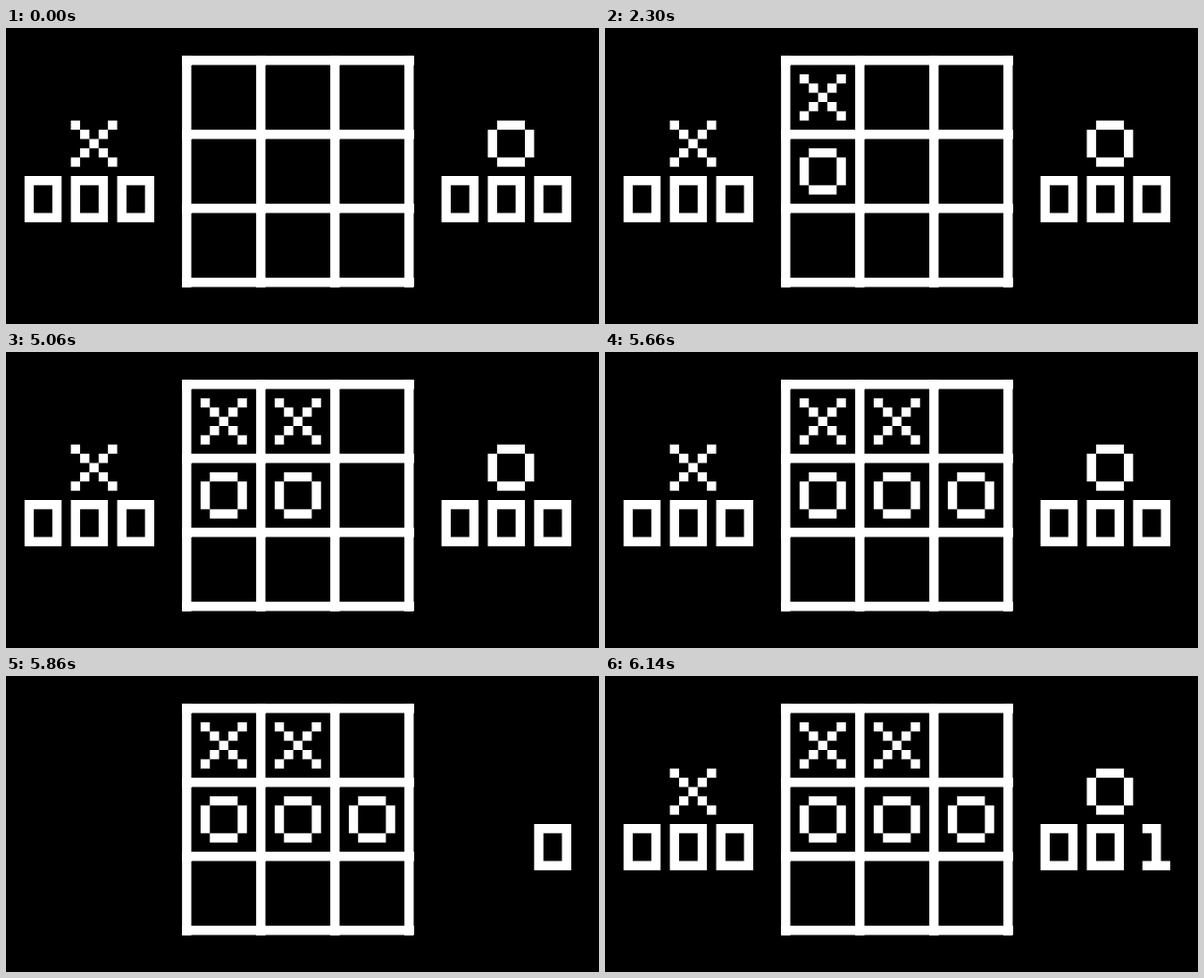
Animation of 600 by 300 pixels, one loop 8 s. Source, as an HTML page with a canvas:

```html
<!DOCTYPE html>
<html lang="en">
<head>
<meta charset="utf-8">
<title>Noughts and crosses</title>
<style>
html, body { margin: 0; width: 100%; height: 100%; overflow: hidden; background: #000; }
canvas { display: block; }
</style>
</head>
<body>
<canvas id="stage" width="600" height="300"></canvas>
<script>
const ctx = document.getElementById('stage').getContext('2d');
const LOOP = 8000;
const UNIT = 600 / 64; // the screen is 64 x 32 blocks

const GLYPHS = {
  X: ['#...#', '.#.#.', '..#..', '.#.#.', '#...#'],
  O: ['.###.', '#...#', '#...#', '#...#', '.###.'],
  0: ['####', '#..#', '#..#', '#..#', '####'],
  1: ['.##.', '..#.', '..#.', '..#.', '.###']
};

// time, mark, column, row
const MOVES = [
  [500, 'O', 0, 1],
  [2300, 'X', 0, 0],
  [3780, 'O', 1, 1],
  [5060, 'X', 1, 0],
  [5660, 'O', 2, 1]
];

// Score parts in drawing order: x, y, glyph before, glyph after
const PARTS = [['X', 2, '000', '000'], ['O', 47, '000', '001']].flatMap(([mark, x, before, after]) => [
  [x + 5, 10, mark, mark],
  ...[0, 1, 2].map(i => [x + 5 * i, 16, before[i], after[i]])
]);

// The score is wiped part by part, then redrawn in the same order
const FIRST_WIPE = 5670, PART_STEP = 30;
const TICK = 40, TICK_OFFSET = 20;

function block(x, y, w, h) {
  ctx.fillRect(x * UNIT, y * UNIT, w * UNIT, h * UNIT);
}

function glyph(name, x, y) {
  GLYPHS[name].forEach((row, j) => {
    for (const run of row.matchAll(/#+/g)) block(x + run.index, y + j, run[0].length, 1);
  });
}

function drawBoard() {
  for (let i = 0; i < 4; i++) {
    block(19 + 8 * i, 3, 1, 25);
    block(19, 3 + 8 * i, 25, 1);
  }
}

function drawScore(t) {
  const shown = Math.floor((t - TICK_OFFSET) / TICK) * TICK + TICK_OFFSET;
  const done = Math.floor((shown - FIRST_WIPE) / PART_STEP) + 1;
  PARTS.forEach(([x, y, before, after], i) => {
    if (done <= i) glyph(before, x, y);
    else if (done > i + PARTS.length) glyph(after, x, y);
  });
}

function render(t) {
  ctx.globalCompositeOperation = 'source-over';
  ctx.fillStyle = '#000';
  ctx.fillRect(0, 0, 600, 300);
  ctx.globalCompositeOperation = 'lighter'; // no seams between touching blocks
  ctx.fillStyle = '#fff';
  drawBoard();
  for (const [time, mark, col, row] of MOVES) {
    if (t >= time) glyph(mark, 21 + 8 * col, 5 + 8 * row);
  }
  drawScore(t);
}

const start = performance.now();
function frame() {
  render((performance.now() - start) % LOOP);
  requestAnimationFrame(frame);
}
frame();
</script>
</body>
</html>
```
